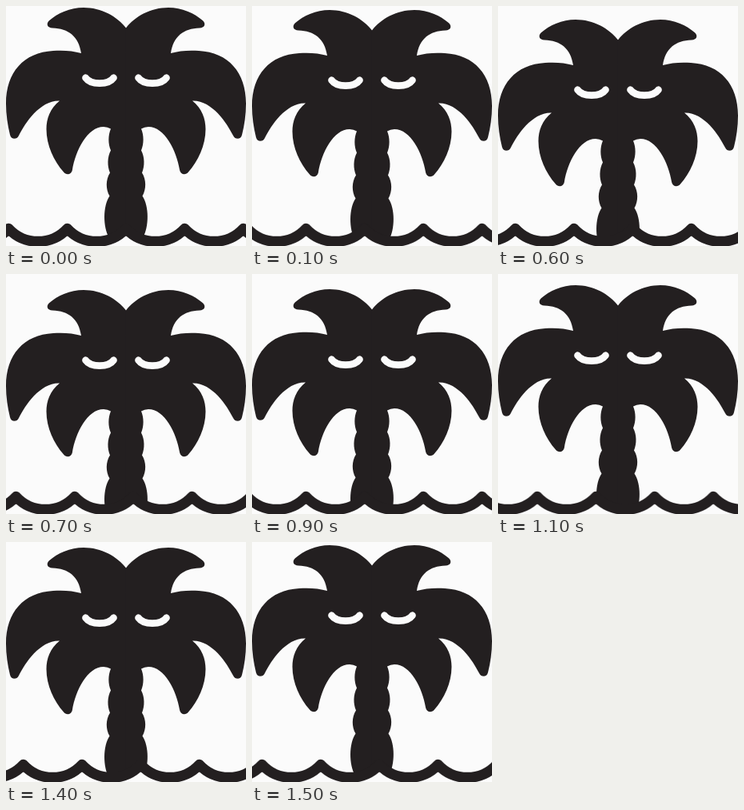
An HTML page for the animation above (1.6 s loop, 300 px wide and 300 px high).

```html
<!DOCTYPE html>
<html lang="en">
<head>
<meta charset="utf-8">
<title>Palm on the waves</title>
<style>
  html, body { margin: 0; width: 100%; height: 100%; overflow: hidden; background: #fbfbfb; }
  svg { display: block; width: 100vw; height: 100vh; }
  .ink { fill: #231f20; }
  .eyes { fill: none; stroke: #fbfbfb; stroke-width: 8.7; stroke-linecap: round; }
  #below { fill: #fbfbfb; }
  #line { fill: none; stroke: #231f20; stroke-width: 13; stroke-linejoin: round; }
</style>
</head>
<body>
<svg viewBox="0 0 300 300">
  <defs>
    <path id="half" d="M150.500 27.500 H150 C139 13 119 2 97 2 C80 2 64.500 9 54 18.300
      C49.500 22.500 52 27.500 58 27.500 C78 28 91 38 94 59
      C84 56 71 55 59 56 C22 58 0 83 0 122 C0 136 2 149 5 161
      C6.500 167.300 13.500 167.300 16 162 C24 146 43 117.500 67 118.500
      C55 128 50.500 141 50.500 154 C50.500 174 60 194 72 207.500
      C75 211.500 81.500 211.300 82.800 205.500 C87 180 102 151 122 151 Q127 151 131 153.500
      C127.500 162 127.500 172 131 180.500 C126.500 189 126.500 200 130 208.500
      C124.500 217 124.500 229 129.500 237.500 C121 250 121 276 129 290 L129 320 H150.500 Z"/>
    <path id="eye" d="M99.500 89.700 C106 99 128 99 134.500 89.700"/>
  </defs>
  <g id="palm">
    <g class="ink">
      <use href="#half"/>
      <use href="#half" transform="matrix(-1 0 0 1 300 0)"/>
    </g>
    <g class="eyes">
      <use href="#eye"/>
      <use href="#eye" transform="matrix(-1 0 0 1 300 0)"/>
    </g>
  </g>
  <g id="sea">
    <path id="below"/>
    <path id="line"/>
  </g>
</svg>
<script>
  const $ = id => document.getElementById(id);
  const span = 220 / 3, radius = 50, crest = 278.3;

  // Hanging arcs meeting in rounded crests, one of them centred at x = 150
  let wave = `M${150 - 3 * span} ${crest}`;
  for (let i = -2; i <= 4; i++) {
    wave += `A${radius} ${radius} 0 0 0 ${150 + i * span} ${crest}`;
  }
  $('line').setAttribute('d', wave);
  $('below').setAttribute('d', `${wave}V350H${150 - 3 * span}Z`);

  const loop = (id, duration, frames) =>
    $(id).animate(frames, { duration, iterations: Infinity }).startTime = 0;
  const pose = (x, y, steps) => ({ transform: `translate(${x}px, ${y}px)`, easing: `steps(${steps})` });

  // Sinks 20 px and rises again at a steady rate, on whole pixels
  const sink = tick => Math.round(20 - 2.5 * Math.abs(tick + 0.1 - 8));

  loop('palm', 1600, Array.from({ length: 17 }, (_, i) => pose(0, sink(i % 16), 1)));
  loop('sea', 800, [pose(0, 0, 8), pose(-span, 0, 8)]);
</script>
</body>
</html>
```
